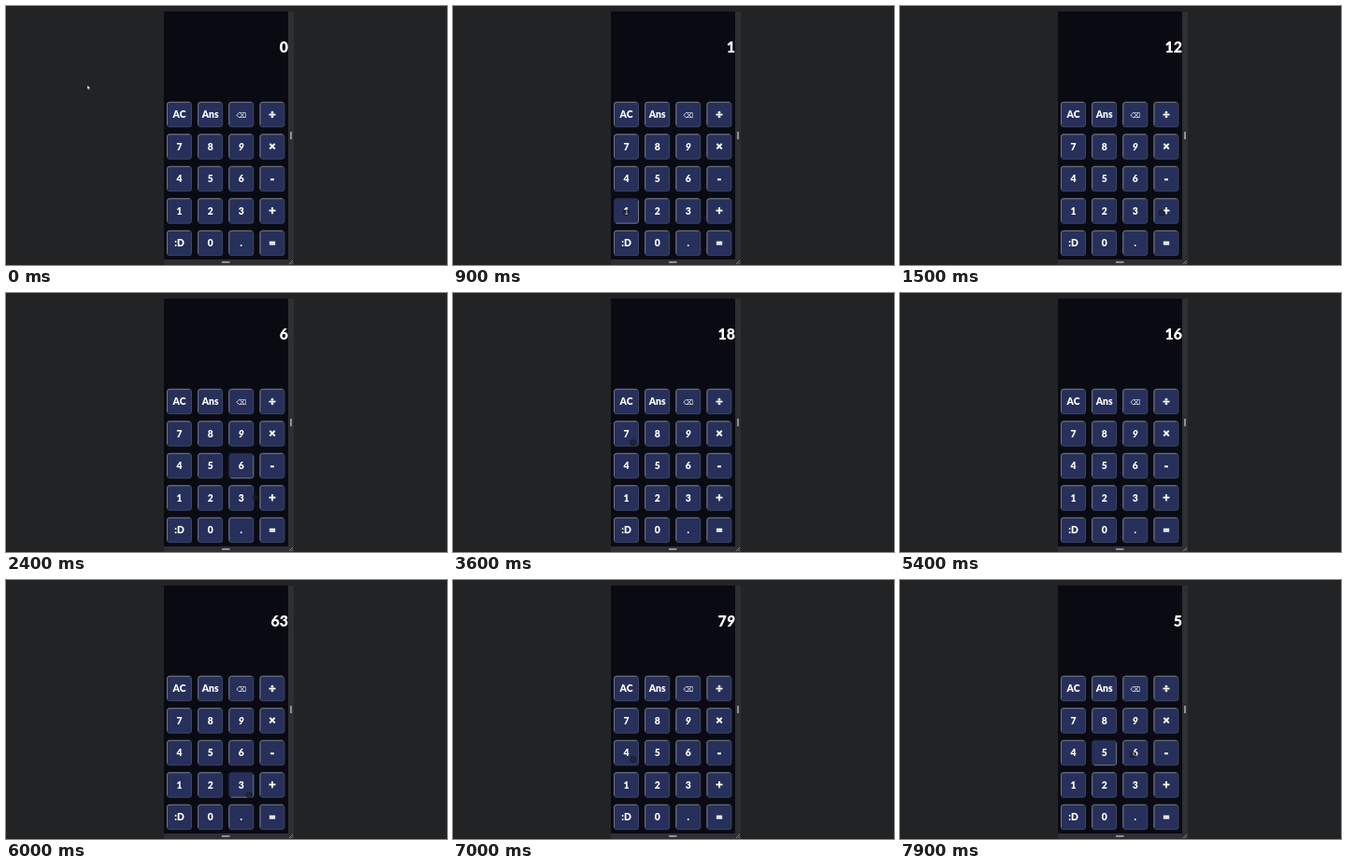
An HTML page that plays this animation: 472x278 px, repeating every 8000 ms.

```html
<!DOCTYPE html>
<html lang="en">
<head>
<meta charset="utf-8">
<title>Calculator</title>
<style>
  html, body { margin: 0; height: 100%; overflow: hidden; background: #212325; }
  svg { display: block; width: 472px; height: 278px; }
  text { font-family: Lato, sans-serif; font-weight: 900; fill: #fff; }
  .italic { font-style: italic; }
  .key text { font-size: 10.4px; text-anchor: middle; }
  .key text.operator { font-size: 13px; stroke: #fff; stroke-width: .4; }
  .key text.erase { font: 7.5px "DejaVu Sans", sans-serif; }
  .key rect { fill: #26305a; stroke: #3f4663; }
  .key path { fill: none; stroke: #707584; }
  .key.lit rect { stroke: #252c4c; }
  .key.lit path { transform: rotate(180deg); }
  #display { font-size: 16px; text-anchor: end; }
</style>
</head>
<body>
<svg viewBox="0 0 472 278">
  <rect width="472" height="278" fill="#212325"/>
  <rect x="169" y="6" width="139" height="272" fill="#2d2f31"/>
  <rect x="169" y="6" width="133" height="266" fill="#0a0a13"/>
  <path d="M305 135v8M231 275h8.500" stroke="#909294" stroke-width="2"/>
  <path d="M303 277l4-4M305.500 277l1.500-1.500" stroke="#999b9d" stroke-width=".8"/>
  <text id="display" x="302" y="49.800"></text>
  <g id="keys"></g>
  <path id="arrow" d="M0 0v4.600l1.100-1 .8 1.600.8-.4-.7-1.500h1.500z" fill="#fff" stroke="#111" stroke-width=".4"/>
  <circle id="touch" r="3" fill="#1d1f25" fill-opacity=".55" stroke="#111319" stroke-opacity=".7"/>
</svg>
<script>
const LOOP = 8000, FRAME = 100, GLOW = 300;
const byId = id => document.getElementById(id);
const isDigit = label => /\d/.test(label);
const labels = ['AC', 'Ans', '⌫', '÷', '7', '8', '9', '×', '4', '5', '6', '-',
  '1', '2', '3', '+', ':D', '0', '.', '='];

const keyCenter = i => ({ x: 185.5 + (i % 4) * 33.15, y: 116.5 + Math.floor(i / 4) * 34.5 });

// Key presses; the pointer's path and the display both follow from these
const taps = [
  [900, '1'], [1200, '2'], [1800, '+'], [2200, '6'], [2900, '='],
  [4000, '7'], [4250, '+'], [4500, '9'], [5300, '+'], [5600, '6'], [5900, '3'], [6400, '='],
  [7400, '4'], [7600, '-'], [7800, '5'], [8150, '-']
].map(([time, key]) => ({ time, key, ...keyCenter(labels.indexOf(key)) }));
const stops = [{ time: 0, x: 87, y: 85 }, ...taps];

const slantNines = text => text.replace(/9/g, '<tspan class="italic">9</tspan>');

byId('keys').innerHTML = labels.map((label, i) => {
  const { x, y } = keyCenter(i);
  const kind = label === '⌫' ? 'erase' : '÷×-+='.includes(label) ? 'operator' : '';
  return `<g class="key" transform="translate(${x} ${y})">
    <rect x="-13" y="-13.200" width="26" height="26.400" rx="2.500"/>
    <path d="M-13 11V-10.700Q-13-13.200-10.500-13.200H11"/>
    <text class="${kind}" y="${kind === 'operator' ? 4.3 : 3.7}">${slantNines(label)}</text></g>`;
}).join('');
const keys = [...byId('keys').children];

function calculate(pressed) {
  let total = 0, operator = '+', entry = '', shown = '0';
  for (const key of pressed) {
    if (isDigit(key)) {
      shown = entry += key;
      continue;
    }
    const sign = operator === '-' ? -1 : 1;
    total = operator === '=' && entry ? +entry : total + sign * entry;
    shown = String(total);
    operator = key;
    entry = '';
  }
  return shown;
}

// Glide to each key, then rest on it shortly before the press
function pointerAt(time) {
  const next = stops.findIndex(stop => stop.time > time);
  const from = stops[next - 1], to = stops[next];
  const gap = to.time - from.time;
  const duration = Math.min(600, gap * 0.6);
  const arrival = to.time - Math.min(300, gap * 0.4);
  const k = Math.min(1, Math.max(0, 1 - (arrival - time) / duration));
  const eased = k * k * (3 - 2 * k);
  return [from.x + (to.x - from.x) * eased, from.y + (to.y - from.y) * eased];
}

function draw(now) {
  const time = Math.floor(now % LOOP / FRAME) * FRAME;
  const done = taps.filter(tap => tap.time <= time);
  const last = done[done.length - 1];
  byId('display').innerHTML = slantNines(calculate(done.map(tap => tap.key)));
  keys.forEach((key, i) => key.classList.toggle('lit',
    !!last && isDigit(last.key) && labels[i] === last.key && time - last.time < GLOW));

  const [x, y] = pointerAt(time);
  const touching = x > 169;
  for (const [id, visible] of [['touch', touching], ['arrow', !touching]]) {
    byId(id).setAttribute('transform', `translate(${x} ${y + (touching ? 2 : 0)})`);
    byId(id).setAttribute('visibility', visible ? 'visible' : 'hidden');
  }
}

const start = performance.now();
function tick() {
  draw(performance.now() - start);
  requestAnimationFrame(tick);
}
tick();
</script>
</body>
</html>
```
